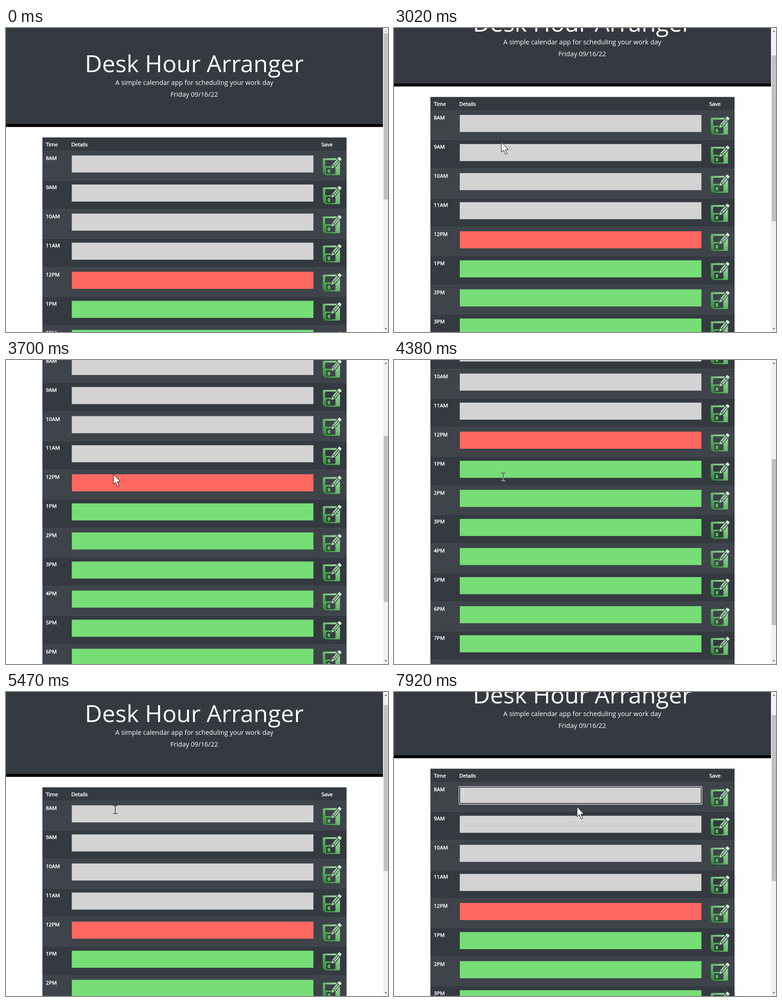
An HTML page that plays this animation: 839x668 px, repeating every 8 s.

```html
<!DOCTYPE html>
<html lang="en">
<head>
<meta charset="utf-8">
<title>Desk Hour Arranger</title>
<style>
  html, body { margin: 0; width: 100%; height: 100%; overflow: hidden; background: #fff; }
  svg { display: block; width: 839px; height: 668px; font-family: "Open Sans", sans-serif; fill: #fff; }
  .mid { text-anchor: middle; }
  .lead { font-size: 14.4px; }
  .cell { font-size: 11.5px; stroke: #fff; stroke-width: .5px; }
  .odd { fill: #3e444a; color: #3e444a; }
  .even { fill: #343a40; color: #343a40; }
  #beam { mix-blend-mode: difference; }
</style>
</head>
<body>
<svg viewBox="0 0 839 668">
  <defs>
    <linearGradient id="leaf" x1="0" y1="1" x2="1" y2="0">
      <stop offset="0" stop-color="#1f8f22"/>
      <stop offset=".45" stop-color="#5fb763"/>
      <stop offset="1" stop-color="#b9e2ba"/>
    </linearGradient>
    <symbol id="disk" width="42" height="42" overflow="visible">
      <path fill="url(#leaf)" d="M3 3H36Q38.500 3 38.500 5.500V37.500Q38.500 40 36 40H6L.8 35V5.200Q.8 3 3 3Z"/>
      <rect x="6" y="7" width="26.500" height="13.500" rx="1.500" fill="currentColor"/>
      <path fill="currentColor" d="M10.500 23.500H26Q28.500 23.500 28.500 26V35Q28.500 37.500 26 37.500H10.500Q8 37.500 8 35V26Q8 23.500 10.500 23.500Z"/>
      <rect x="11.500" y="27" width="5.500" height="8" rx="1" fill="#58b45c"/>
      <g transform="translate(18.500 26.500) rotate(-49)" stroke="currentColor" stroke-width="1.300" stroke-linejoin="round">
        <path fill="#9ed3a0" d="M0 0L8 -4.500H31Q33 -4.500 33 -2.500V2.500Q33 4.500 31 4.500H8Z"/>
        <path fill="#cdeacd" d="M25.500 -4.500H31Q33 -4.500 33 -2.500V2.500Q33 4.500 31 4.500H25.500Z"/>
        <path fill="none" d="M8 -4.500L10 0L8 4.500M10 0H25"/>
      </g>
    </symbol>
  </defs>

  <g id="page">
    <rect width="828" height="210.300" fill="#343a40"/>
    <rect y="210.300" width="828" height="7.200" fill="#000"/>
    <text class="mid" x="413.500" y="97" font-size="51.700">Desk Hour Arranger</text>
    <text class="mid lead" x="413.500" y="125">A simple calendar app for scheduling your work day</text>
    <text class="mid lead" x="413.500" y="151">Friday 09/16/22</text>
    <rect class="even" x="80" y="240.500" width="668" height="31"/>
    <g class="cell">
      <text x="87.500" y="260.200">Time</text>
      <text x="143.200" y="260.200">Details</text>
      <text x="692.500" y="260.200">Save</text>
    </g>
    <g id="rows"></g>
    <g id="focus" fill="none" stroke-width="1.500">
      <rect x="142.900" y="279.700" width="533.300" height="38.700" rx="1.800" stroke="#fff"/>
      <rect x="144.200" y="281" width="530.700" height="36.100" rx="1" stroke="#101010"/>
      <path d="M152 285.500V301" stroke="#f4f4f4" stroke-width=".8"/>
    </g>
  </g>

  <rect x="828.300" width="10.700" height="668" fill="#f1f1f1"/>
  <rect id="thumb" x="829.600" width="9.400" height="365" fill="#c1c1c1"/>
  <path id="up" d="M831.500 8.500L834.200 5.500L837 8.500Z"/>
  <path d="M831.500 659.800L834.200 662.800L837 659.800Z" fill="#505050"/>

  <path id="arrow" d="M0 0V22L5 17.500L9.200 27L12.500 25.500L8.400 16.300H15Z" stroke="#000"/>
  <path id="beam" d="M-4.500 -8.500H-1Q0 -8.500 0 -7.500Q0 -8.500 1 -8.500H4.500M0 -7.500V7.500M-4.500 8.500H-1Q0 8.500 0 7.500Q0 8.500 1 8.500H4.500" fill="none" stroke="#fff" stroke-width="1.400"/>
</svg>
<script>
const LOOP = 8000, ROW = 63.9, TOP = 270.5;
const $ = id => document.getElementById(id);

function rowMarkup(i) {
  const y = TOP + ROW * i, hour = 8 + i;
  const label = (hour > 12 ? hour - 12 : hour) + (hour < 12 ? 'AM' : 'PM');
  const fill = hour < 12 ? '#d3d3d3' : hour === 12 ? '#ff6961' : '#77dd77';
  return `<g class="${i % 2 ? 'even' : 'odd'}">
    <rect x="80" y="${y}" width="668" height="${ROW + .2}"/>
    <rect x="80" y="${y - .5}" width="668" height="1" fill="#454d55"/>
    <rect x="143.500" y="${y + 9.5}" width="531.700" height="37.500" fill="${fill}"/>
    <rect x="143.300" y="${y + 9.5}" width="1" height="37.500" fill="#111"/>
    <use href="#disk" x="695" y="${y + 12.7}"/>
  </g><text class="cell" x="87.500" y="${y + 19.7}">${label}</text>`;
}
$('rows').innerHTML = Array.from({ length: 14 }, (_, i) => rowMarkup(i)).join('');

// Bursts of motion: start, end, number of screen updates
const bursts = [
  [970, 1730, 11], [1870, 2070, 4], [2670, 2810, 3], [3020, 3150, 3],
  [3350, 4050, 11], [4300, 5060, 11], [5130, 5200, 2], [5400, 5610, 4],
  [6210, 6210, 1], [6410, 6760, 6], [7500, 7920, 7]
];
const scrollKeys = [
  [2600, 0], [2670, 17], [2740, 55], [2810, 72], [2955, 72], [3020, 89],
  [3085, 127], [3150, 144], [3280, 144], [3350, 158], [3700, 284.5],
  [3980, 410], [4050, 432], [4224, 432], [4300, 415], [4832, 156.5],
  [5060, 38], [5130, 12], [5200, 0], [5330, 0], [5400, 8], [5470, 31],
  [5540, 58], [5610, 72]
];
const pointerKeys = [
  [970, 801, 70], [1274, 610, 185], [1578, 435, 256], [1730, 379, 218],
  [1803, 379, 218], [2070, 236, 251], [5330, 236, 251], [5400, 236, 252.6],
  [6200, 236, 252.6], [6210, 236, 253.2], [6340, 236, 253.2], [6410, 238, 256],
  [6760, 224, 223], [7430, 224, 223], [7920, 402, 252]
];

// Time of the latest screen update
function lastUpdate(t) {
  let held = 0;
  for (const [start, end, n] of bursts) {
    if (t < start) break;
    const step = (end - start) / Math.max(1, n - 1);
    held = t >= end ? end : start + Math.floor((t - start) / step) * step;
  }
  return held;
}

function at(keys, t, col = 1) {
  const i = keys.findIndex(k => k[0] > t);
  if (i === 0) return keys[0][col];
  if (i < 0) return keys[keys.length - 1][col];
  const a = keys[i - 1], b = keys[i];
  return a[col] + (b[col] - a[col]) * (t - a[0]) / (b[0] - a[0]);
}

const show = (el, on) => el.setAttribute('visibility', on ? 'visible' : 'hidden');
const move = (el, x, y) => el.setAttribute('transform', `translate(${x} ${y})`);

function draw(now) {
  const t = lastUpdate(now % LOOP);
  const scroll = at(scrollKeys, t);
  const x = at(pointerKeys, t, 1), y = at(pointerKeys, t, 2);
  const typing = (t >= 4050 && t < 6410) || (t > 6410 && y < 246);

  move($('page'), 0, -scroll);
  $('thumb').setAttribute('y', 11.7 + scroll * .545);
  $('up').setAttribute('fill', scroll ? '#505050' : '#a3a3a3');
  move($('arrow'), x, y);
  move($('beam'), x + 4, y + 6);
  show($('arrow'), t >= 970 && !typing);
  show($('beam'), typing);
  show($('focus'), t >= 7500);
  requestAnimationFrame(draw);
}
requestAnimationFrame(draw);
</script>
</body>
</html>
```
